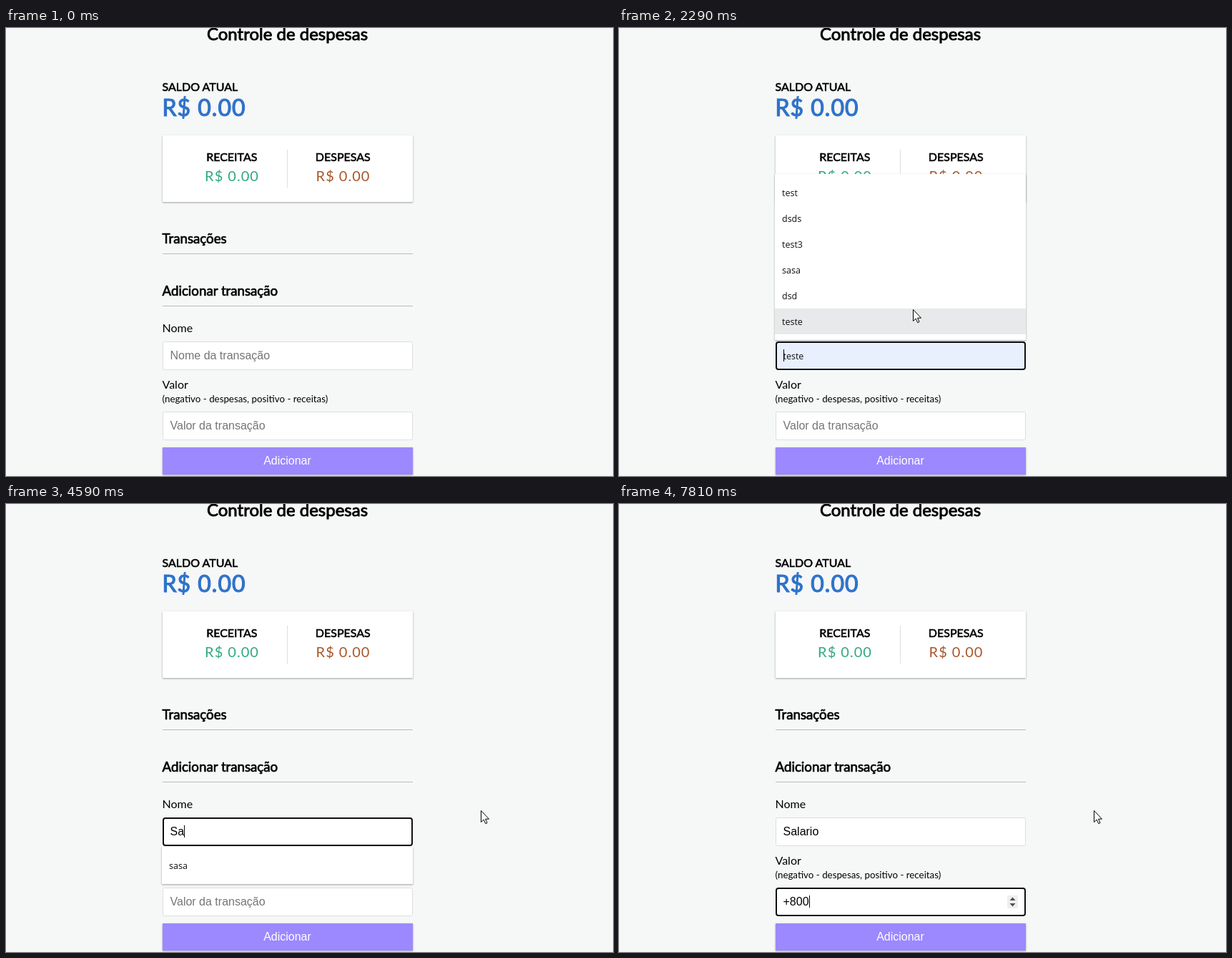
An HTML page that plays this animation: 849x626 px, repeating every 8 s.

```html
<!DOCTYPE html>
<html lang="pt">
<head>
<meta charset="utf-8">
<title>Controle de despesas</title>
<style>
  html, body { margin: 0; width: 100%; height: 100%; overflow: hidden; background: #f6f7f7; }
  svg { display: block; width: 849px; height: 626px; font: 16px Lato, sans-serif; color: #000; }
  text { fill: currentColor; white-space: pre; }
  .bold { stroke: currentColor; stroke-width: .036em; }
  .mid { text-anchor: middle; }
  .h2 { font-size: 24px; }
  .h3 { font-size: 18.72px; }
  .balance { font-size: 32px; letter-spacing: 1px; color: #2f73c9; }
  .money { font-size: 20px; letter-spacing: 1px; }
  .small { font-size: 13.33px; }
  .ui { font-family: "Liberation Sans", Arial, sans-serif; }
  .item, .preview { font: 12.5px "Open Sans", sans-serif; color: #111; }
  .hint { color: #757575; }
  .raised { filter: drop-shadow(0 1px 1.5px rgba(0,0,0,.12)) drop-shadow(0 1px 1px rgba(0,0,0,.24)); }
  .frame { fill: #fff; stroke: #dedede; }
  .frame.focus { stroke: #101010; stroke-width: 2; }
  .frame.filled { fill: #e8f0fe; }
</style>
</head>
<body>
<svg viewBox="0 0 849 626">
  <text class="h2 bold mid" x="393.5" y="17">Controle de despesas</text>
  <text class="bold" x="218.5" y="88">SALDO ATUAL</text>
  <text class="balance bold" x="218.5" y="123">R$ 0.00</text>

  <rect class="raised" x="219" y="150" width="350" height="93" fill="#fff"/>
  <rect x="393" y="170" width="1" height="53" fill="#dedede"/>
  <text class="bold mid" x="315.8" y="186">RECEITAS</text>
  <text class="bold mid" x="471.3" y="186">DESPESAS</text>
  <text class="money mid" x="316" y="214" color="#30a97d">R$ 0.00</text>
  <text class="money mid" x="471.5" y="214" color="#a8562a">R$ 0.00</text>

  <text class="h3 bold" x="218.5" y="301">Transações</text>
  <rect x="219" y="315" width="350" height="1" fill="#bbb"/>
  <text class="h3 bold" x="218.5" y="374">Adicionar transação</text>
  <rect x="219" y="388" width="350" height="1" fill="#bbb"/>

  <text x="218.5" y="425">Nome</text>
  <g id="name"><rect class="frame"/><text class="ui"></text></g>
  <text x="218.5" y="504">Valor</text>
  <text class="small" x="218.5" y="522.5">(negativo - despesas, positivo - receitas)</text>
  <g id="value"><rect class="frame"/><text class="ui"></text></g>
  <g id="spin">
    <rect x="543" y="547" width="15" height="18" fill="#efefef"/>
    <path d="M546.5 554l4-4.5 4 4.5zM546.5 558l4 4.5 4-4.5z" fill="#505050"/>
  </g>
  <rect id="caret" width="1" height="17"/>

  <rect class="raised" x="219" y="586" width="350" height="38" fill="#9c88ff"/>
  <text class="ui mid" x="393.5" y="610" color="#fff">Adicionar</text>

  <g id="popup">
    <rect class="raised" x="218" width="351" fill="#fff"/>
    <rect id="hover" x="218" width="351" height="36" fill="#e8e9ea"/>
    <g id="items"></g>
  </g>

  <path id="arrow" d="M.5 .5V16.5L4.2 13.1L6.7 18.6L9 17.6L6.6 12.2H11.5Z" fill="#fff" stroke="#000"/>
  <path id="beam" d="M-3.5 -7.5H-1L0 -6.5L1 -7.5H3.5M0 -6.5V6.5M-3.5 7.5H-1L0 6.5L1 7.5H3.5" fill="none" stroke="#000"/>
</svg>
<script>
const LOOP = 8000, ROW = 36, PAD = 8, TEXT_X = 229.5;
const $ = id => document.getElementById(id);
const show = (el, on) => el.style.display = on ? '' : 'none';

const fields = {
  name: { top: 438, hint: 'Nome da transação' },
  value: { top: 536, hint: 'Valor da transação' }
};
const lists = {
  names: { top: 204, rows: ['test', 'dsds', 'test3', 'sasa', 'dsd', 'teste'] },
  pair: { top: 479, rows: ['sasa', 'sdds'] },
  one: { top: 479, rows: ['sasa'] },
  amounts: { top: 302, rows: ['100', '200', '-50', '500', '-20', '300'] }
};

// time, focused field, name, value, open list
const states = [
  [0, '', '', '', ''],
  [1820, 'name', '', '', ''],
  [1890, 'name', '', '', 'names'],
  [3520, 'name', 's', '', 'pair'],
  [4200, 'name', '', '', ''],
  [4330, 'name', 'S', '', ''],
  [4390, 'name', 'S', '', 'pair'],
  [4590, 'name', 'Sa', '', 'one'],
  [4720, 'name', 'Sal', '', ''],
  [4790, 'name', 'Sala', '', ''],
  [4860, 'name', 'Salar', '', ''],
  [4990, 'name', 'Salari', '', ''],
  [5050, 'name', 'Salario', '', ''],
  [5250, 'value', 'Salario', '', ''],
  [6480, 'value', 'Salario', '+', 'amounts'],
  [7340, 'value', 'Salario', '+8', 'amounts'],
  [7410, 'value', 'Salario', '+8', ''],
  [7610, 'value', 'Salario', '+80', ''],
  [7810, 'value', 'Salario', '+800', '']
];
const caretOff = [[2490, 3020], [4120, 4200], [5860, 6410], [7010, 7340]];

// pointer moves: start, end, steps, from, to
const moves = [
  [260, 540, 5, [820, 614], [832, 567]],
  [800, 1355, 9, [826, 564], [382, 353]],
  [1430, 1490, 2, [378, 376], [379, 424]],
  [1560, 1620, 2, [382, 462], [378, 473]],
  [1890, 2285, 7, [379, 470], [411, 393]],
  [2780, 2845, 2, [432, 389], [486, 390]],
  [2910, 3040, 3, [566, 404], [664, 428]]
];

const latest = (list, t) => list.filter(e => e[0] <= t).pop();

function pointer(t) {
  const move = latest(moves, t);
  if (!move) return null;
  const [start, end, steps, from, to] = move;
  const step = Math.floor((t - start) / (end - start) * (steps - 1) + 1e-6);
  const p = Math.min(1, step / (steps - 1));
  const k = steps > 3 ? p * p * (3 - 2 * p) : p;
  return from.map((v, i) => Math.round(v + (to[i] - v) * k));
}

function drawField(id, text, focused, preview) {
  const { top, hint } = fields[id];
  const [rect, label] = $(id).children;
  const inset = focused ? 1 : .5;
  const box = { x: 219 + inset, y: top + inset, width: 350 - 2 * inset, height: 40 - 2 * inset, rx: focused ? 3 : 2 };
  for (const key in box) rect.setAttribute(key, box[key]);
  rect.setAttribute('class', 'frame' + (focused ? ' focus' : '') + (preview ? ' filled' : ''));
  label.setAttribute('class', preview ? 'preview' : text ? 'ui' : 'ui hint');
  label.setAttribute('x', TEXT_X);
  label.setAttribute('y', top + 25);
  label.textContent = preview || text || hint;
  if (focused) {
    const width = text && !preview ? label.getComputedTextLength() : 0;
    $('caret').setAttribute('x', Math.round(TEXT_X + width));
    $('caret').setAttribute('y', top + 11);
  }
}

function drawList(list, row) {
  show($('popup'), list);
  if (!list) return;
  const first = list.top + PAD;
  const back = $('popup').firstElementChild;
  back.setAttribute('y', list.top);
  back.setAttribute('height', list.rows.length * ROW + 2 * PAD);
  show($('hover'), row >= 0);
  $('hover').setAttribute('y', first + row * ROW);
  $('items').innerHTML = list.rows.map((s, i) =>
    `<text class="item" x="228" y="${first + i * ROW + 23}">${s}</text>`).join('');
}

function drawPointer(at, overList) {
  const overField = at && !overList && at[0] >= 219 && at[0] < 569 &&
    Object.values(fields).some(f => at[1] >= f.top && at[1] < f.top + 40);
  show($('arrow'), at && !overField);
  show($('beam'), overField);
  if (!at) return;
  $('arrow').setAttribute('transform', `translate(${at})`);
  $('beam').setAttribute('transform', `translate(${at[0] + .5} ${at[1] + .5})`);
}

function draw(t) {
  const [, focus, name, value, open] = latest(states, t);
  const list = lists[open], at = pointer(t);
  const overList = list && at && at[0] >= 218 && at[0] < 569 &&
    at[1] >= list.top && at[1] < list.top + list.rows.length * ROW + 2 * PAD;
  let row = overList ? Math.floor((at[1] - list.top - PAD) / ROW) : -1;
  if (!list || !list.rows[row]) row = -1;
  const preview = row >= 0 ? list.rows[row] : '';

  drawField('name', name, focus === 'name', focus === 'name' && preview);
  drawField('value', value, focus === 'value', focus === 'value' && preview);
  show($('spin'), focus === 'value');
  show($('caret'), focus && !caretOff.some(([a, b]) => t >= a && t < b));
  drawList(list, row);
  drawPointer(at, overList);
}

function tick() {
  draw(performance.now() % LOOP);
  requestAnimationFrame(tick);
}
tick();
</script>
</body>
</html>
```
